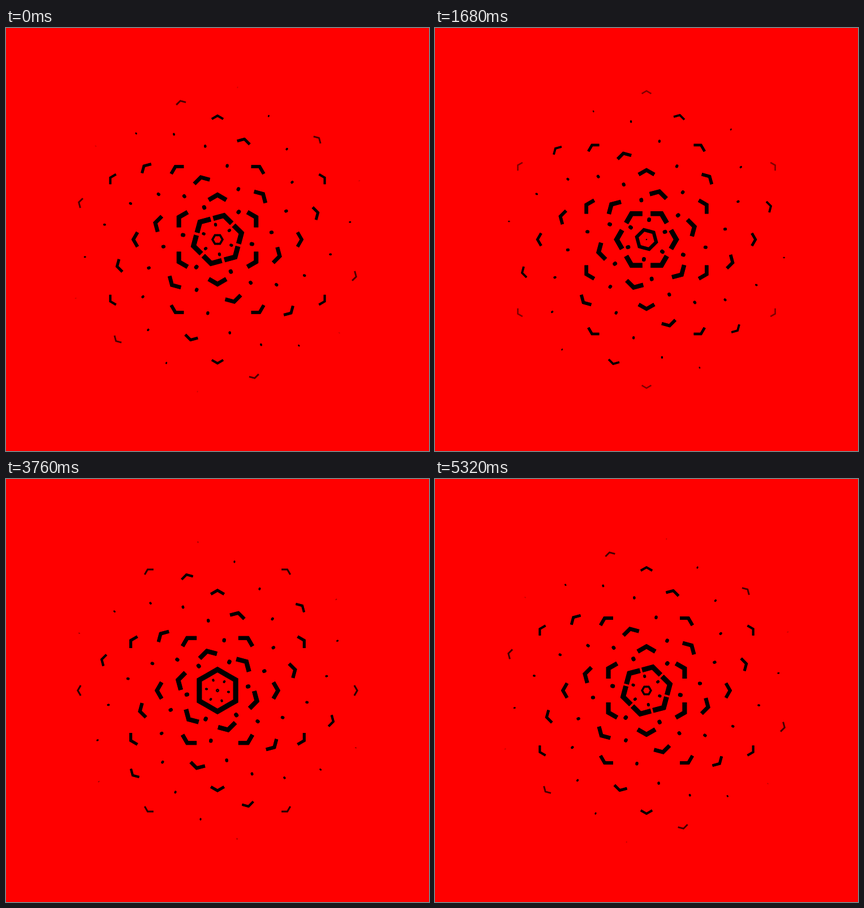
An HTML page with a canvas for the animation above (5360 ms loop, 748x748 px).

```html
<!DOCTYPE html>
<html lang="en">
<head>
<meta charset="utf-8">
<title>Hexagon bloom</title>
<style>
  html, body { margin: 0; height: 100%; overflow: hidden; background: #f00; }
  canvas { display: block; }
</style>
</head>
<body>
<canvas id="stage" width="748" height="748"></canvas>
<script>
const ctx = document.getElementById('stage').getContext('2d');
const LOOP = 5360, STEP = 40, CENTER = 374;
const GAP = 35;                    // distance between rings; four rings pass per loop
const TAIL = 10;                   // length of the inward shade
const clamp = x => Math.max(0, Math.min(1, x));

function chevron(r) {
  const arm = Math.min(r / 2 + 0.3, 21.5 - 0.045 * r);
  const x = arm * Math.cos(Math.PI / 6), y = arm / 2 - r;
  ctx.lineWidth = Math.min(1.5 + 0.26 * r, 10 - 0.028 * r);
  ctx.lineCap = 'butt';
  ctx.beginPath();
  ctx.moveTo(-x, y);
  ctx.lineTo(0, -r);
  ctx.lineTo(x, y);
}

function dot(r) {
  ctx.lineWidth = Math.min(0.8 + 0.17 * r, 8.4 - 0.024 * r);
  ctx.lineCap = 'round';
  ctx.beginPath();
  ctx.moveTo(0, -r - 0.6);
  ctx.lineTo(0, -r + 0.6);
}

// Six copies of a shape around the centre, each with a shade fading inward
function ring(shape, r, degrees, shade) {
  const alpha = clamp((278 - r) / 45);
  if (r <= 0 || !alpha) return;
  const depth = shade * clamp((r - 22) / 30) * alpha;
  for (let i = 0; i < 6; i++) {
    ctx.save();
    ctx.rotate((degrees + i * 60) * Math.PI / 180);
    shape(r);
    ctx.globalAlpha = alpha;
    ctx.stroke();
    for (let d = 1; d <= TAIL && depth; d++) {
      ctx.translate(0, 1);
      ctx.globalAlpha = depth * (1 - d / (TAIL + 1));
      ctx.stroke();
    }
    ctx.restore();
  }
}

function draw(now) {
  const t = Math.floor((now % LOOP) / STEP) * STEP;
  const shift = 4 * GAP * t / LOOP;
  ctx.setTransform(1, 0, 0, 1, 0, 0);
  ctx.globalAlpha = 1;
  ctx.fillStyle = '#f00';
  ctx.fillRect(0, 0, 748, 748);
  ctx.translate(CENTER, CENTER);
  ctx.strokeStyle = '#000';
  for (let n = -4; n < 8; n++) {
    const r = shift + n * GAP;
    ring(chevron, r + 8.9, 30 - 15 * n, 0.15);
    ring(dot, r + 26.4, -7.5 - 15 * n, 0.07);
  }
  requestAnimationFrame(draw);
}
requestAnimationFrame(draw);
</script>
</body>
</html>
```
